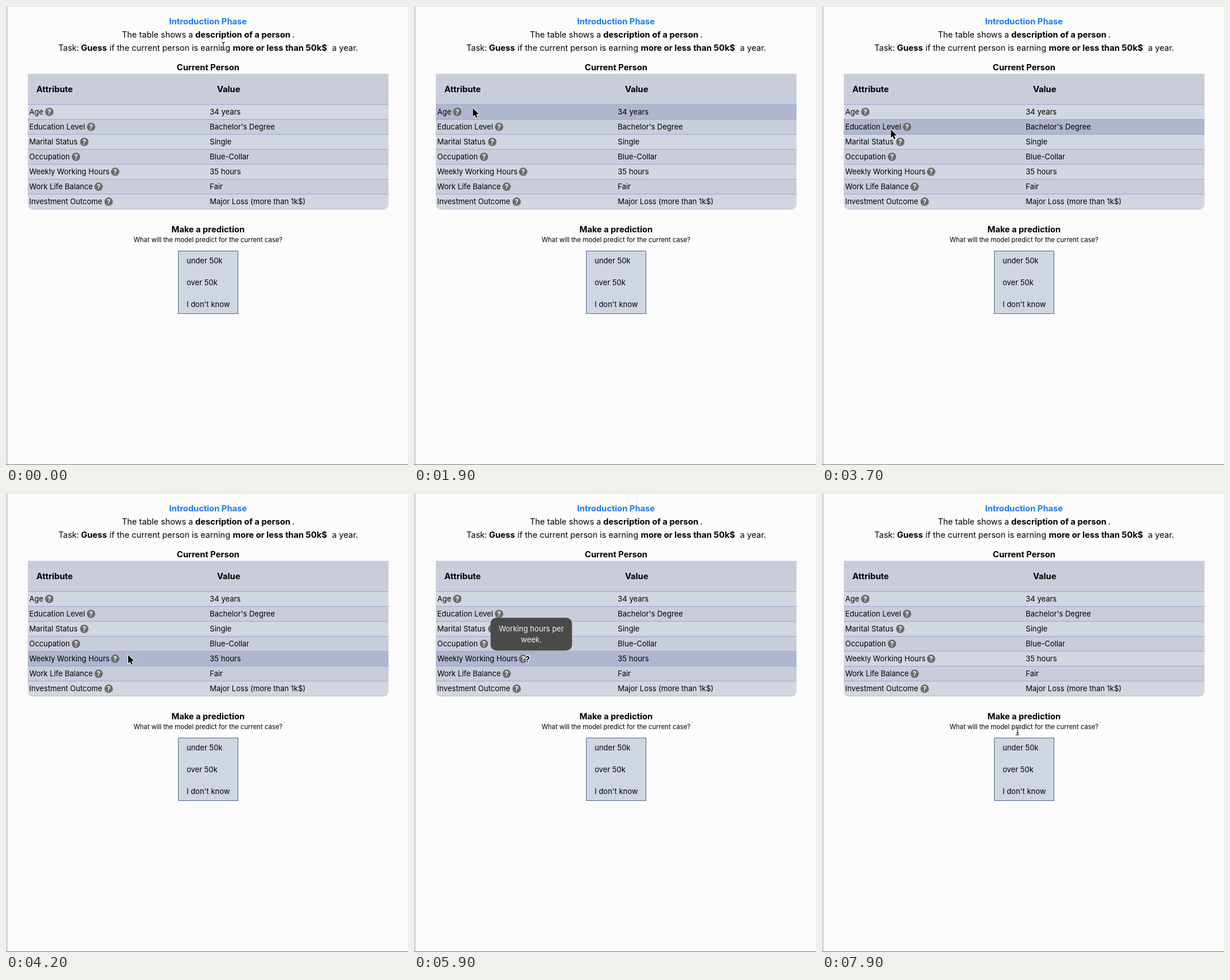
Recreate the animation shown at these times as an HTML page with a canvas. Size 701 by 799 pixels, loop 8000 ms.

```html
<!DOCTYPE html>
<html lang="en">
<head>
<meta charset="utf-8">
<title>Introduction Phase</title>
<style>
  html, body { margin: 0; width: 100%; height: 100%; overflow: hidden; background: #fcfcfd; }
  canvas { display: block; }
</style>
</head>
<body>
<canvas id="stage" width="701" height="799"></canvas>
<script>
const ctx = document.getElementById('stage').getContext('2d');
const LOOP = 8000, STEP = 100;
const FAMILY = 'Inter, "Open Sans", sans-serif';
const BODY = '400 14.45px ' + FAMILY;
const BOLD = '700 14.7px ' + FAMILY;
const CELL = '400 13px ' + FAMILY;
const SMALL = '400 11.3px ' + FAMILY;

const TABLE = { x: 38, y: 118, w: 629, top: 171, rowH: 26.04 };

// label, icon centre, value, tooltip lines
const rows = [
  ['Age', 75.5, '34 years', ['The age of the', 'person.']],
  ['Education Level', 148.3, "Bachelor's Degree"],
  ['Marital Status', 136.5, 'Single'],
  ['Occupation', 122, 'Blue-Collar'],
  ['Weekly Working Hours', 190.3, '35 hours', ['Working hours per', 'week.']],
  ['Work Life Balance', 161.5, 'Fair'],
  ['Investment Outcome', 179, 'Major Loss (more than 1k$)']
];

// time, x, y of the pointer
const path = [
  [0, 379, 70], [400, 372, 74], [1000, 190, 154], [1400, 150, 167],
  [1600, 148, 169], [2100, 78, 183], [2900, 76, 183], [3400, 77, 184],
  [4200, 213, 282], [4700, 212, 288], [5000, 197, 290], [6200, 198, 290],
  [7100, 341, 311], [7300, 342, 316], [7800, 341, 414], [8000, 341, 415]
];

// areas where the pointer turns into a text caret: x1, y1, x2, y2
const textZones = [
  [282, 18, 422, 37], [202, 40, 503, 60], [91, 61, 613, 83], [296, 97, 408, 117],
  [287, 379, 418, 398], [221, 399, 483, 417]
];

function text(str, x, y, font, color = '#000', align = 'left') {
  ctx.font = font;
  ctx.fillStyle = color;
  ctx.textAlign = align;
  ctx.fillText(str, x, y);
}

function rect(x, y, w, h, color) {
  ctx.fillStyle = color;
  ctx.fillRect(x, y, w, h);
}

function rounded(x, y, w, h, r) {
  ctx.beginPath();
  ctx.roundRect(x, y, w, h, r);
}

function rowTop(i) { return TABLE.top + i * TABLE.rowH; }

function pointerAt(t) {
  let i = 0;
  while (i < path.length - 2 && t >= path[i + 1][0]) i++;
  const [t0, x0, y0] = path[i], [t1, x1, y1] = path[i + 1];
  const u = (t - t0) / (t1 - t0), e = u * u * (3 - 2 * u);
  return { x: x0 + (x1 - x0) * e, y: y0 + (y1 - y0) * e };
}

function drawHeading() {
  rect(0, 0, 701, 799, '#fcfcfd');
  rect(0, 0, 3, 799, '#d2d6e2');
  rect(0, 0, 701, 1, '#dcdcde');
  rect(0, 798, 701, 1, '#77787c');
  text('Introduction Phase', 352.3, 32, BOLD, '#1a7df0', 'center');
  text('The table shows a', 202, 55, BODY);
  text('description of a person', 330, 55, BOLD);
  text('.', 498.7, 55, BODY);
  text('Task:', 91.3, 78, BODY);
  text('Guess', 130.7, 78, BOLD);
  text('if the current person is earning', 180.5, 78, BODY);
  text('more or less than 50k$', 395.5, 78, BOLD);
  text('a year.', 568.5, 78, BODY);
  text('Current Person', 352.3, 112, BOLD, '#000', 'center');
}

function drawIcon(x, y) {
  ctx.fillStyle = '#6c6c6c';
  ctx.beginPath();
  ctx.arc(x, y, 7.3, 0, Math.PI * 2);
  ctx.fill();
  text('?', x, y + 4.1, '700 11.5px ' + FAMILY, '#fff', 'center');
}

function drawTable(active) {
  const bottom = rowTop(rows.length);
  ctx.save();
  rounded(TABLE.x, TABLE.y, TABLE.w, bottom - TABLE.y + 0.5, [0, 0, 8, 8]);
  ctx.clip();
  rect(TABLE.x, TABLE.y, TABLE.w, TABLE.top - TABLE.y, '#c9cdda');
  rows.forEach((row, i) => {
    const y = Math.round(rowTop(i)), h = Math.round(rowTop(i + 1)) - y;
    rect(TABLE.x, y, TABLE.w, h, i === active ? '#b0b6cf' : i % 2 ? '#c9cdda' : '#d2d6e0');
  });
  for (let i = 0; i <= rows.length; i++) {
    rect(TABLE.x, Math.round(rowTop(i)), TABLE.w, 1, '#98a8cd');
  }
  ctx.restore();
  text('Attribute', 53, 150, BOLD);
  text('Value', 368, 150, BOLD);
  rows.forEach(([label, iconX, value], i) => {
    const y = rowTop(i);
    text(label, 40.5, Math.round(y + 18), CELL);
    text(value, 355.3, Math.round(y + 18), CELL);
    drawIcon(iconX, y + 13.4);
  });
}

function drawChoices() {
  text('Make a prediction', 352.3, 394, BOLD, '#000', 'center');
  text('What will the model predict for the current case?', 352.3, 411, SMALL, '#000', 'center');
  rect(300, 427, 105, 109, '#d0d5e2');
  ctx.strokeStyle = '#4c648f';
  ctx.lineWidth = 1;
  ctx.strokeRect(300.5, 426.5, 104, 109);
  ['under 50k', 'over 50k', "I don't know"].forEach((s, i) => text(s, 315, 448 + i * 38, CELL));
}

function drawTip(i) {
  const [, iconX, , lines] = rows[i];
  const cx = iconX + 14.2, y = rowTop(i) - 58;
  ctx.fillStyle = '#4a4a48';
  rounded(cx - 71, y, 142, 57, 10);
  ctx.fill();
  lines.forEach((s, k) => text(s, cx, Math.round(y + 23.5 + k * 19), CELL, '#f4f4f4', 'center'));
}

function drawArrow(x, y) {
  const pts = [[0, 0], [0, 14.5], [3.3, 11.4], [5.7, 16.8], [8, 15.8], [5.7, 10.5], [10.3, 10.3]];
  ctx.beginPath();
  pts.forEach(([px, py]) => ctx.lineTo(x + px, y + py));
  ctx.closePath();
  ctx.lineJoin = 'round';
  ctx.lineWidth = 2;
  ctx.strokeStyle = '#fff';
  ctx.stroke();
  ctx.fillStyle = '#000';
  ctx.fill();
}

function drawCaret(x, y) {
  const stroke = (color, width) => {
    ctx.strokeStyle = color;
    ctx.lineWidth = width;
    ctx.beginPath();
    ctx.moveTo(x - 3, y - 7);
    ctx.quadraticCurveTo(x, y - 7, x, y - 4.5);
    ctx.lineTo(x, y + 4.5);
    ctx.quadraticCurveTo(x, y + 7, x - 3, y + 7);
    ctx.moveTo(x + 3, y - 7);
    ctx.quadraticCurveTo(x, y - 7, x, y - 4.5);
    ctx.moveTo(x, y + 4.5);
    ctx.quadraticCurveTo(x, y + 7, x + 3, y + 7);
    ctx.moveTo(x - 2, y + 3);
    ctx.lineTo(x + 2, y + 3);
    ctx.stroke();
  };
  stroke('rgba(255,255,255,.8)', 2.6);
  stroke('#1c1c1c', 1.1);
}

function drawHelp(x, y) {
  ctx.lineJoin = 'round';
  ctx.lineWidth = 2.4;
  ctx.strokeStyle = '#fff';
  ctx.font = '700 14px ' + FAMILY;
  ctx.textAlign = 'center';
  ctx.strokeText('?', x, y + 5);
  ctx.fillStyle = '#000';
  ctx.fillText('?', x, y + 5);
}

function render(t) {
  const { x, y } = pointerAt(t);
  const inTable = x >= TABLE.x && x <= TABLE.x + TABLE.w && y >= TABLE.top && y < rowTop(rows.length);
  const active = inTable ? Math.floor((y - TABLE.top) / TABLE.rowH) : -1;
  const onIcon = active >= 0 && rows[active][3] &&
    Math.hypot(x - rows[active][1], y - rowTop(active) - 13.4) < 9;
  const onText = textZones.some(([x1, y1, x2, y2]) => x >= x1 && x <= x2 && y >= y1 && y <= y2);

  drawHeading();
  drawTable(active);
  drawChoices();
  if (onIcon) drawTip(active);
  (onIcon ? drawHelp : onText ? drawCaret : drawArrow)(x, y);
}

const start = performance.now();
function frame() {
  const t = Math.max(0, performance.now() - start) % LOOP;
  render(Math.floor(t / STEP) * STEP);
  requestAnimationFrame(frame);
}
frame();
</script>
</body>
</html>
```
